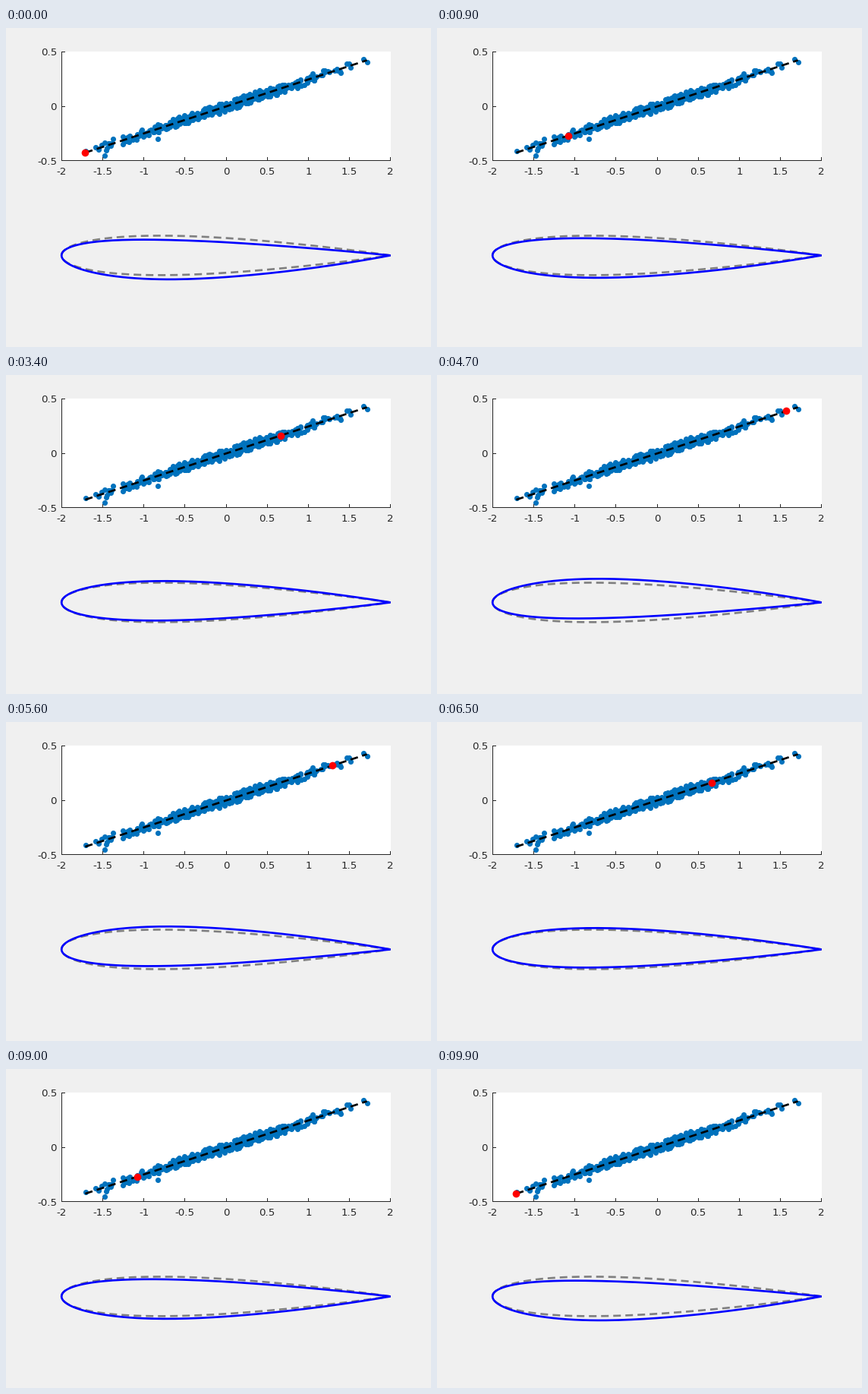
Animation, 560 px wide and 420 px high, one loop 10000 ms. Source, as a matplotlib script:

```python
import numpy as np
import matplotlib.pyplot as plt
from matplotlib.animation import FuncAnimation
from matplotlib.patches import Rectangle

W, H, DPI = 560, 420, 100
PT = 72 / DPI  # points per pixel
FRAMES, INTERVAL = 100, 100
INK = "#262626"
LINE = 2.67 * PT
DASH = (0, (10 * PT, 6 * PT))
REACH, SLOPE = 1.712, 0.248
LEFT, RIGHT, TOP, BOTTOM = 73, 507, 31, 175
CHORD = 433.2

plt.rcParams["font.family"] = "DejaVu Sans"
plt.rcParams["lines.scale_dashes"] = False

fig = plt.figure(figsize=(W / DPI, H / DPI), dpi=DPI, facecolor="#f0f0f0")
ax = fig.add_axes([0, 0, 1, 1])
ax.set(xlim=(0, W), ylim=(H, 0))
ax.axis("off")


def px(v):
    return 73.2 + (v + 2) * 108.4


def py(v):
    return 103.3 - v * 143.3


def rule(x, y):
    ax.plot(x, y, color=INK, lw=PT, solid_capstyle="butt", snap=False,
            zorder=6)


def label(x, y, v, align):
    ax.text(x, y, f"{v:g}", size=13.33 * PT, color=INK,
            ha=align, va="baseline")


def draw_axes():
    ax.add_patch(Rectangle((LEFT, TOP), RIGHT - LEFT, BOTTOM - TOP,
                           fc="white", ec="none", zorder=0))
    x0, y0 = LEFT + 0.5, BOTTOM - 0.5
    rule([LEFT, RIGHT], [y0, y0])
    rule([x0, x0], [TOP, BOTTOM])
    for v in np.arange(-2, 2.1, 0.5):
        x = np.floor(px(v)) + 0.5
        rule([x, x], [y0, y0 - 4.5])
        label(px(v), 193, v, "center")
    for v in (0.5, 0, -0.5):
        y = np.floor(py(v)) + 0.5
        rule([x0, x0 + 4.5], [y, y])
        label(67, y + 5, v, "right")


def draw_cloud():
    rng = np.random.default_rng(12)
    x = rng.normal(0, 0.65, 500)
    x = x[np.abs(x) < 1.65]
    y = SLOPE * x + np.clip(rng.normal(0, 0.02, x.size), -0.045, 0.045)
    # strays that give the cloud its silhouette
    stray_x = [-1.71, -1.48, -1.48, -0.83, 1.67, 1.72]
    stray_y = [-0.41, -0.45, -0.335, -0.295, 0.435, 0.405]
    ax.plot(px(np.append(x, stray_x)), py(np.append(y, stray_y)), "o",
            color="#0072bd", ms=7.1 * PT, mew=0, zorder=1)


def dashed(x, y, color):
    ax.plot(x, y, color=color, lw=LINE, ls=DASH, dash_capstyle="butt",
            zorder=2)


def thickness(s):
    return 0.6 * (0.2969 * np.sqrt(s) - 0.126 * s - 0.3516 * s**2
                  + 0.2843 * s**3 - 0.1036 * s**4)


def camber(s, p=0.4):
    front = (2 * p * s - s**2) / p**2
    back = (1 - 2 * p + 2 * p * s - s**2) / (1 - p)**2
    return np.where(s < p, front, back)


# outline runs from the tail over the top to the nose and back below
theta = np.linspace(0, 2 * np.pi, 241)
s = (1 + np.cos(theta)) / 2
side = np.where(theta <= np.pi, 1, -1)


def foil(a):
    lift = 0.0134 * a / REACH * camber(s)
    return px(-2) + CHORD * s, 299.4 - CHORD * (side * thickness(s) + lift)


draw_axes()
draw_cloud()
ends = np.array([-REACH, REACH])
dashed(px(ends), py(SLOPE * ends), "black")
dashed(*foil(0), "#808080")
wing, = ax.plot(*foil(-REACH), color="blue", lw=LINE,
                solid_capstyle="butt", zorder=3)
dot, = ax.plot([], [], "o", color="red", ms=9.7 * PT, mew=0, zorder=7)


def update(i):
    step = min(i, FRAMES - 1 - i)
    a = -REACH + 2 * REACH * step / (FRAMES // 2 - 1)
    dot.set_data([px(a)], [py(SLOPE * a)])
    wing.set_data(*foil(a))
    return dot, wing


anim = FuncAnimation(fig, update, frames=FRAMES, interval=INTERVAL,
                     repeat=True, repeat_delay=0)
plt.show()
```
